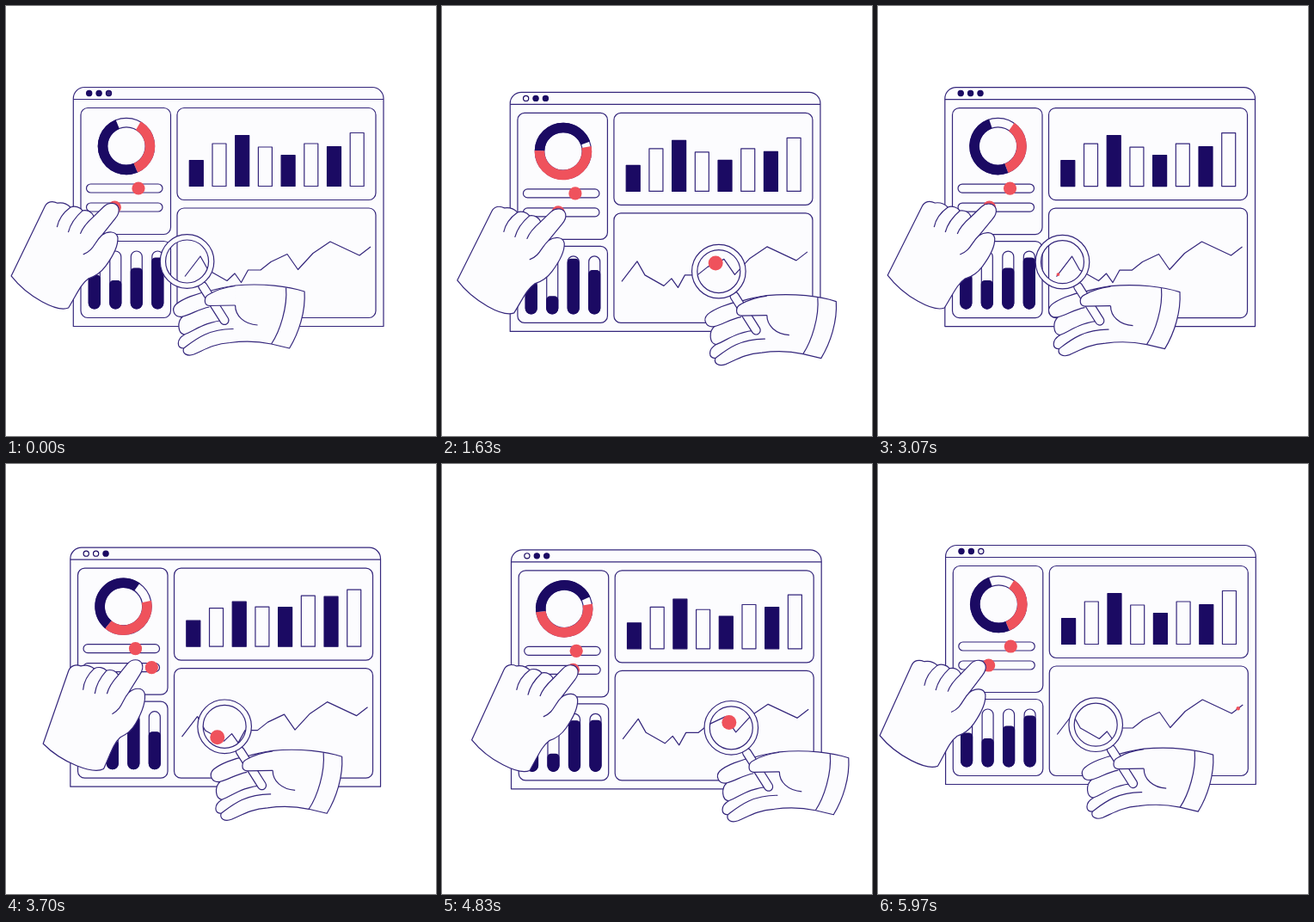
Write an HTML page with a canvas that moves like this. It is 500 px wide and 500 px high and loops after 6.01 s.

```html
<!DOCTYPE html>
<html lang="en">
<head>
<meta charset="utf-8">
<title>Dashboard</title>
<style>
html, body { margin: 0; width: 100%; height: 100%; overflow: hidden; background: #fff; }
canvas { display: block; }
</style>
</head>
<body>
<canvas id="stage" width="500" height="500"></canvas>
<script>
const ctx = document.getElementById('stage').getContext('2d');
const NAVY = '#1b0a63', RED = '#ef525c', LINE = '#35277c', PAPER = '#fcfcfe';
const LOOP = 6010, CYCLE = 90, HALF = 45; // ms, then ticks: two cycles per loop
const TAU = Math.PI * 2;

const clamp = v => Math.max(0, Math.min(1, v));
const ease = (f, from, to) => {
  const s = clamp((f - from) / (to - from));
  return s * s * (3 - 2 * s);
};
// Rises from 0 to 1 at `up`, falls back at `down`.
const pulse = (f, up, down, rise, fall = rise) => ease(f, up, up + rise) - ease(f, down, down + fall);

function paint(path, fill, stroke = LINE) {
  if (fill) { ctx.fillStyle = fill; ctx.fill(path, 'evenodd'); }
  if (stroke) { ctx.strokeStyle = stroke; ctx.stroke(path); }
}
function box(x, y, w, h, r, fill, stroke) {
  const p = new Path2D();
  p.roundRect(x, y, w, h, r);
  paint(p, fill, stroke);
}
function disc(x, y, r, fill, stroke) {
  const p = new Path2D();
  p.arc(x, y, r, 0, TAU);
  paint(p, fill, stroke);
}

// Travel of the dragged slider knob.
function knob(f) {
  const s = Math.abs(Math.sin(Math.PI * f / HALF));
  return 23.5 * s * (1 + s);
}

function drawHeader(f) {
  box(78.3, 94.5, 360.7, 278, [13, 13, 0, 0], PAPER);
  paint(new Path2D('M78.3 108.5H439'));
  for (let i = 0; i < 3; i++) {
    const x = 96.7 + i * 11.4;
    const away = Math.abs(f % HALF - 13.2 - i * 10.4);
    ctx.globalAlpha = clamp((Math.min(away, HALF - away) - 9.7) / 1.5);
    disc(x, 101.5, 3.2, NAVY, null);
    ctx.globalAlpha = 1;
    disc(x, 101.5, 3.1, null, NAVY);
  }
}

function drawDonut(f) {
  const x = 140, y = 163, w = Math.sin(Math.PI * f / CYCLE);
  const redFrom = 30 + 50 * Math.min(1, 1.45 * w);
  const split = 157 + 116 * w ** 1.5;
  const navyTo = 338 + 93 * w ** 1.2;
  const arc = (from, to, color) => {
    ctx.beginPath();
    ctx.arc(x, y, 27.5, (from - 90) * TAU / 360, (to - 90) * TAU / 360);
    ctx.lineWidth = 11.5;
    ctx.strokeStyle = color;
    ctx.stroke();
    ctx.lineWidth = 1.2;
  };
  disc(x, y, 32.6);
  disc(x, y, 22.2);
  arc(redFrom, split, RED);
  arc(split, navyTo, NAVY);
}

function drawSliders(f) {
  for (const y of [212, 234]) box(93.5, y - 5, 88.5, 10, 5, PAPER);
  disc(154, 212, 7.6, RED, null);
  disc(126.3 + knob(f), 234, 7.6, RED, null);
}

const tubes = [
  { top: 313, change: 3, up: 35, down: 70 },
  { top: 319.5, change: 12.5, up: 26, down: 72 },
  { top: 305, change: -16.5, up: 11, down: 50 },
  { top: 293, change: 19, up: 11, down: 42 }
];
function drawTubes(f) {
  tubes.forEach((t, i) => {
    const x = 96.3 + i * 24.5;
    const top = t.top + t.change * pulse(f, t.up, t.down, 13);
    box(x, 285, 13, 67, 6.5, PAPER);
    box(x, top, 13, 352 - top, [4, 4, 6.5, 6.5], NAVY, NAVY);
  });
}

const low = [30, 49.5, 59, 45.5, 36, 49.5, 46, 62];
const high = [30, 44.5, 52, 46, 45.5, 59, 58, 66];
function drawBars(f) {
  const mix = pulse(f % HALF, 6, 27, 13);
  low.forEach((a, i) => {
    const h = a + (high[i] - a) * mix, dark = i % 2 === 0;
    box(213.3 + i * 26.7, 209.5 - h, 16, h, 0, dark ? NAVY : PAPER, dark ? NAVY : LINE);
  });
}

const trend = [[208, 314.5], [226, 291], [235, 307], [257, 319.5], [266, 311], [273.5, 321.5],
  [281.5, 307], [296, 307], [308, 297.5], [327, 288.5], [339.5, 306.5], [357, 287.5],
  [377, 274], [411, 290], [424, 280]];
const lengths = trend.slice(1).map(([x, y], i) => Math.hypot(x - trend[i][0], y - trend[i][1]));
const total = lengths.reduce((a, b) => a + b);

function drawTrend(f) {
  const p = new Path2D();
  trend.forEach(q => p.lineTo(...q));
  paint(p);
  let i = 0, d = total * Math.max(0, f - 1) / CYCLE;
  while (d > lengths[i]) d -= lengths[i++];
  const s = d / lengths[i], [x, y] = trend[i], [x2, y2] = trend[i + 1];
  const r = 8.5 * clamp(Math.min(f / 9, (CYCLE - f) / 4.5));
  disc(x + (x2 - x) * s, y + (y2 - y) * s, r, RED, null);
}

const leftHand = new Path2D(`M7 313L47 233C50 227 56 226 62 229C68 228 73 230 77 234
  C82 232 88 234 91 238C97 237 102 240 104 245L116 233.5C122 228 131 229 133 236
  C134 241 132 244 129 247.5L113 267C120 262 130 262 131.5 270C132 279 126 291 117 303
  C111 311 104 315 97 317C88 323 83 335 73 351C60 356 26 338 7 313Z`);
const leftLines = new Path2D(`M77 234C70 239 63 247 61 257M91 238C84 244 77 252 74 263
  M104 245C97 251 91 257 88 265M113 267C104 275 104 284 91 289`);

function drawLeftHand(f) {
  const press = pulse((f + 6) % HALF, 0, 9, 7.5, 20);
  ctx.save();
  ctx.translate(77 + 1.1 * (knob(f + 1.5) - knob(1.5)), 388);
  ctx.rotate((press - 1) * 7.6 * TAU / 360);
  ctx.translate(-77, -388);
  paint(leftHand, PAPER);
  paint(leftLines);
  ctx.restore();
}

const rightHand = new Path2D(`M240 331C222 334 206 341 199 347C193 353 197 363 207 361
  C200 367 201 381 209 382C199 388 200 398 208 398C206 404 212 408 220 405
  C232 400 242 393 262 391.5C280 389 296 390 310 393L331 398C342 380 350 355 348.5 332
  C330 326 300 322 268 325C255 327 246 329 240 331Z`);
const rightLines = new Path2D(`M207 361C216 359 226 352 238 350M209 382C222 377 232 367 258 365
  M208 398C220 389 236 375 266 375.5M327 327.5C329 350 320 378 310 393`);
const thumb = new Path2D('M268 348L238 348.5C231 348 231 338 238 335C248 329 257 327 268 325.5');
const palm = new Path2D('M268 348C268 360 278 370 294 371');

function drawMagnifier(f) {
  const back = clamp((f - 80) / 10) ** 2;
  const x = -1.5 + 2.26 * f - 203 * back;
  const y = 7 * Math.max(0, Math.sin(Math.PI * f / 70)) + 36 * back * (1 - back);
  ctx.save();
  ctx.translate(x, y);
  paint(rightHand, PAPER);
  paint(rightLines);

  ctx.save();
  ctx.translate(212, 297);
  ctx.rotate(Math.atan2(71, 45));
  box(29, -5, 57, 10, 5, PAPER);
  ctx.restore();

  paint(thumb, PAPER);
  paint(palm);

  const ring = new Path2D();
  for (const r of [31.3, 25]) {
    ring.moveTo(212 + r, 297);
    ring.arc(212, 297, r, 0, TAU);
  }
  paint(ring, PAPER);
  ctx.restore();
}

function draw(now) {
  const f = (now % LOOP) / LOOP * 2 * CYCLE % CYCLE;
  const turn = f / CYCLE * TAU;
  ctx.clearRect(0, 0, 500, 500);
  ctx.save();
  ctx.lineWidth = 1.2;
  ctx.lineJoin = 'round';
  ctx.translate(-3.5 * Math.sin(turn), 3 * (1 - Math.cos(turn)));
  drawHeader(f);
  box(87, 118.5, 104.5, 147, 8);
  box(199, 118.5, 231, 107, 8);
  box(87, 273.5, 104.5, 89, 8);
  box(199, 235, 231, 127.5, 8);
  drawDonut(f);
  drawSliders(f);
  drawTubes(f);
  drawBars(f);
  drawTrend(f);
  drawLeftHand(f);
  drawMagnifier(f);
  ctx.restore();
}

const start = performance.now();
function tick() {
  draw(performance.now() - start);
  requestAnimationFrame(tick);
}
tick();
</script>
</body>
</html>
```
